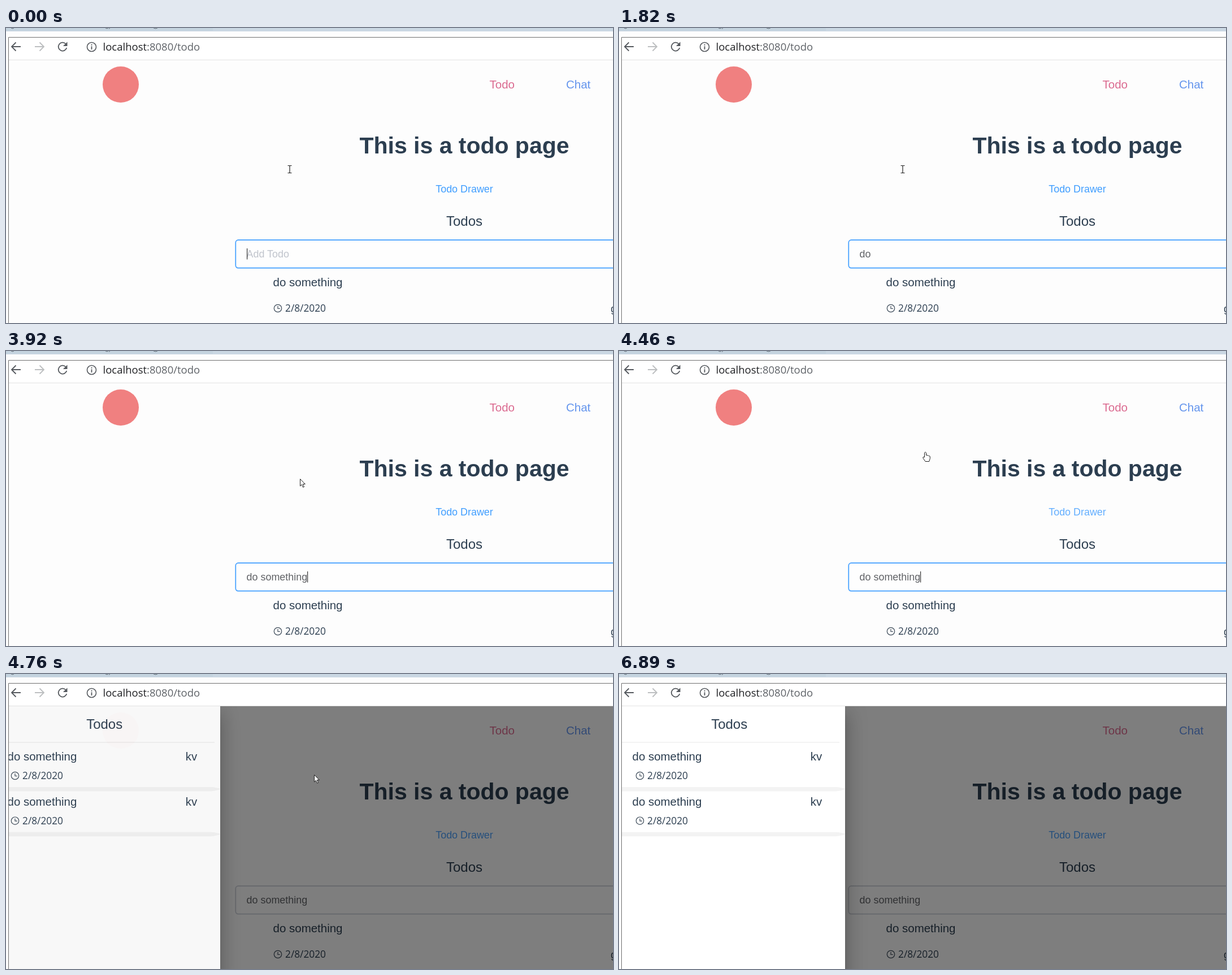
Animation of 1074x522 px, one loop 7.32 s. Source, as an HTML page:

```html
<!DOCTYPE html>
<html lang="en">
<head>
<meta charset="utf-8">
<title>Todo page</title>
<style>
  html, body { margin: 0; width: 100%; height: 100%; overflow: hidden; background: #fdfdfd; }
  svg { display: block; width: 1074px; height: 522px; }
  text { font-family: "Liberation Sans", Arial, sans-serif; font-size: 20.48px; fill: #2c3e50; white-space: pre; }
  .mid { text-anchor: middle; }
  .h1 { font-size: 40.96px; font-weight: bold; }
  .h3 { font-size: 23.96px; }
  .small { font-size: 17.92px; }
  .date { font-family: "Open Sans", "Noto Sans", sans-serif; font-size: 17.3px; }
  .url { font-family: "Open Sans", "Noto Sans", sans-serif; font-size: 18.5px; fill: #202124; }
  .line { fill: none; stroke: #55595e; stroke-width: 1.8; }
  .clock { fill: none; stroke: #3c4a58; stroke-width: 1.2; }
  .cursor { fill: #fff; stroke: #222; stroke-width: 1; }
</style>
</head>
<body>
<svg viewBox="0 0 1074 522">
  <defs>
    <clipPath id="viewport"><rect x="5" y="57" width="1069" height="465"/></clipPath>
    <g id="clock" class="clock"><circle r="6.7"/><path d="M0-4V0.5H4"/></g>
    <g id="stamp">
      <use href="#clock" x="37" y="180"/>
      <text class="date" x="50" y="186">2/8/2020</text>
    </g>
    <g id="card">
      <text x="23.5" y="153">do something</text>
      <text x="338.7" y="153">kv</text>
      <use href="#stamp"/>
      <path d="M5 200H384Q396 201 400 203.5Q396 206 384 207.5H5Z" fill="#f3f3f3"/>
    </g>
  </defs>

  <rect width="1074" height="522" fill="#fdfdfd"/>
  <rect width="1074" height="6" fill="#cad7e3"/>
  <rect width="366" height="5" fill="#c4d3df"/>
  <path d="M9 0q3 2 5 0M176 0q3 2 5 0M184 0l-2 1.5M261 0q4 2 7 0" fill="none" stroke="#5b6670"/>
  <rect x="5" y="17" width="1069" height="39" fill="#fff"/>
  <path d="M5 56.5H1074" stroke="#e2e2e2"/>
  <path d="M1074 16.5H4.5V522" fill="none" stroke="#707070"/>

  <path class="line" d="M26 33H10.5M17.5 25.5L10 33L17.5 40.5"/>
  <path class="line" d="M51 33H66.5M59.5 25.5L67 33L59.5 40.5" style="stroke:#bcbec0"/>
  <path class="line" d="M105.5 28A7.4 7.4 0 1 0 107.3 35"/>
  <path d="M108.5 24.5V32H101Z" fill="#55595e"/>
  <circle class="line" cx="151.5" cy="33.5" r="8" style="stroke-width:1.6"/>
  <path class="line" d="M151.5 32.3V38M151.5 28.8V30.7"/>
  <text class="url" x="171.5" y="40">localhost<tspan fill="#5f6368">:8080/todo</tspan></text>

  <g clip-path="url(#viewport)">
    <circle cx="203" cy="100" r="32" fill="#f08080"/>
    <text x="855.6" y="107" style="fill:#db6a90">Todo</text>
    <text x="991" y="107" style="fill:#6495ed">Chat</text>
    <text class="h1 mid" x="811" y="222">This is a todo page</text>
    <text class="small mid" id="link" x="811" y="291">Todo Drawer</text>
    <text class="h3 mid" x="811" y="350">Todos</text>
    <rect id="field" x="406.3" y="375.2" width="810" height="49.4" rx="4.5" fill="#fff" fill-opacity=".6" stroke-width="1.7"/>
    <text class="small" id="hint" x="425.6" y="405.8" style="fill:#c0c4cc">Add Todo</text>
    <text class="small" id="typed" x="425.6" y="405.8" xml:space="preserve" style="fill:#606266"></text>
    <rect id="caret" y="390" width="1.2" height="19.5" fill="#333"/>
    <text x="472.6" y="457">do something</text>
    <use href="#clock" x="481" y="496"/>
    <text class="date" x="494" y="502">2/8/2020</text>
    <text class="small" x="1070" y="503">g</text>

    <rect id="shade" x="5" y="57" width="1069" height="465"/>
    <g id="drawer">
      <rect x="12" y="74" width="381" height="470" opacity=".2" style="filter:blur(6.5px)"/>
      <rect x="2" y="75" width="401" height="490" opacity=".14" style="filter:blur(15.5px)"/>
      <rect x="-2" y="58" width="409" height="500" opacity=".12" style="filter:blur(19px)"/>
      <rect x="5" y="57" width="395" height="465" fill="#fff"/>
      <text class="h3 mid" x="195.2" y="97">Todos</text>
      <path d="M5 121H390" stroke="#efefef" stroke-width="1.3"/>
      <use href="#card"/>
      <use href="#card" y="79.7"/>
    </g>
  </g>

  <g id="beam" fill="none" stroke="#222" stroke-width="1.2">
    <path d="M-3.5-6.5H-1Q0-6.5 0-5.5Q0-6.5 1-6.5H3.5M0-6V6M-3.5 6.5H-1Q0 6.5 0 5.5Q0 6.5 1 6.5H3.5"/>
  </g>
  <path id="arrow" class="cursor" d="M.5.5V13L3.3 10.3L5.5 15.2L7.5 14.3L5.4 9.5H9.3Z"/>
  <path id="hand" class="cursor" d="M3.5 10V2Q5-.5 6.5 2V6.5Q8 5.5 9 7Q10.5 6.2 11.2 7.7Q13 7.2 13.3 9V12.5L11.7 17.5H5L1 11.5Q.3 9.5 2 9.5Z"/>
</svg>
<script>
  const LOOP = 7320;
  const PHRASE = "do something";
  const OPEN = 4610;

  // Each track holds [start in ms, ...values]; values stay until the next row.
  const typing = [[0, 0], [860, 1], [980, 2], [1260, 3], [1970, 4], [2090, 5], [2370, 6],
    [2520, 7], [3070, 9], [3220, 10], [3340, 11], [3490, 12]];
  const blink = [[0, 1], [400, 0], [860, 1], [1820, 0], [1970, 1], [2920, 0], [3070, 1],
    [4040, 0], [4460, 1], [OPEN, 0]];
  const pointer = [[0, "beam", 502, 250], [3920, "arrow", 520, 226], [4040, "arrow", 536, 203],
    [4190, "arrow", 541, 194], [4310, "hand", 539, 188], [4460, "hand", 537, 178],
    [OPEN, "arrow", 545, 178], [6350, "arrow", 570, 189], [6500, "arrow", 645, 245],
    [6620, "arrow", 820, 374], [6740, "arrow", 985, 496], [6890, "none", 0, 0]];
  const sliding = [[0, -395, 0, 0], [OPEN, -322, .25, .2], [4760, -21, .95, .5], [4910, 0, 1, .5]];
  const linkColor = [[0, "#409eff"], [4310, "#53a8ff"], [4460, "#62aeff"], [OPEN, "#4a9ffa"]];
  const fieldColor = [[0, "#409eff"], [OPEN, "#b2c2d8"], [4760, "#ccd0d8"]];

  const el = id => document.getElementById(id);
  const set = (id, name, value) => el(id).setAttribute(name, value);
  const at = (track, t) => track.findLast(row => row[0] <= t).slice(1);

  function draw(t) {
    const text = PHRASE.slice(0, at(typing, t)[0]);
    if (el("typed").textContent !== text) el("typed").textContent = text;
    set("hint", "opacity", text ? 0 : 1);
    const width = text ? el("typed").getComputedTextLength() : 0;
    set("caret", "x", Math.floor(426 + width));
    set("caret", "opacity", at(blink, t)[0]);

    el("link").style.fill = at(linkColor, t)[0];
    set("field", "stroke", at(fieldColor, t)[0]);

    const [offset, opacity, shade] = at(sliding, t);
    set("drawer", "transform", `translate(${offset} 0)`);
    set("drawer", "opacity", opacity);
    set("shade", "opacity", shade);

    const [shape, x, y] = at(pointer, t);
    for (const id of ["beam", "arrow", "hand"]) {
      set(id, "visibility", id === shape ? "visible" : "hidden");
      set(id, "transform", `translate(${x} ${y})`);
    }
  }

  const start = performance.now();
  function tick() {
    draw((performance.now() - start) % LOOP);
    requestAnimationFrame(tick);
  }
  tick();
</script>
</body>
</html>
```
